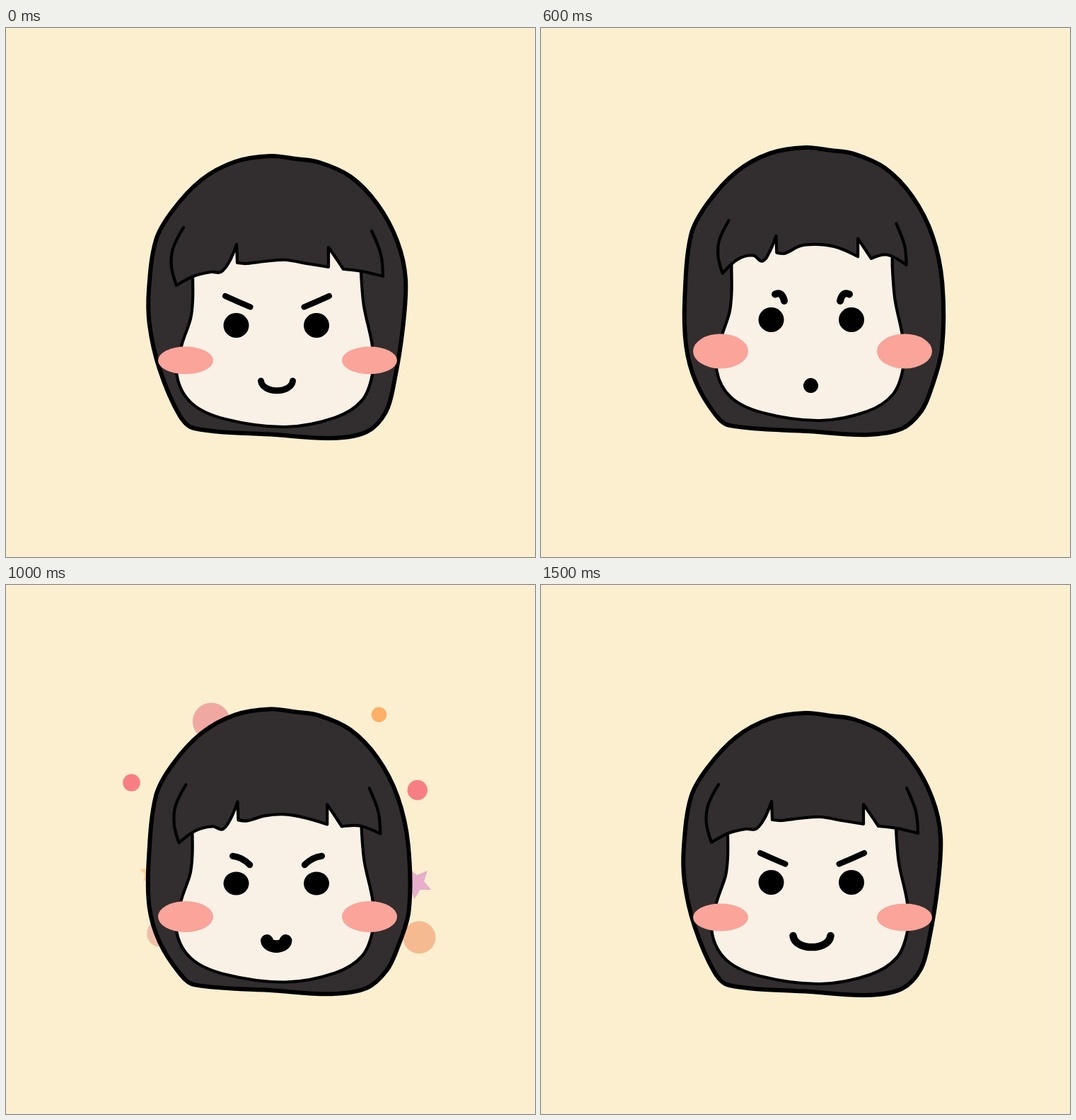
Recreate the animation shown at these times as an HTML page with a canvas. Size 748 by 748 pixels, loop 2 s.

```html
<!DOCTYPE html>
<html lang="en">
<head>
<meta charset="utf-8">
<title>Bobbing head</title>
<style>
  html, body { margin: 0; width: 100%; height: 100%; overflow: hidden; background: #fcefd0; }
  canvas { display: block; }
</style>
</head>
<body>
<canvas id="stage" width="748" height="748"></canvas>
<script>
const ctx = document.getElementById('stage').getContext('2d');
const LOOP = 2000, STEP = 100, CENTER = 384;
const BACKDROP = '#fcefd0', HAIR = '#322d2e', SKIN = '#f9f1e6', BLUSH = '#faa49a', INK = '#000';

// Outlines at rest, as flat x, y lists.
const HEAD = [374,181, 410,185, 443,190, 487,210, 525,249, 553,301, 565,355, 561,425, 549,500, 537,543, 510,571,
  460,580, 380,575, 266,566, 245,547, 217,482, 203,420, 202,370, 212,300, 235,259, 276,215, 324,189];
const FACE = [264,352, 264,385, 261,411, 248,450, 242,493, 263,531, 310,553, 395,564, 465,551, 503,527, 518,490,
  518,450, 506,393, 502,345];
const FRINGE = [251,282, 236,312, 234,338, 241,364, 265,351, 290,345, 304,345, 316,330, 326,306, 327,332, 340,333,
  365,330, 395,328, 425,333, 456,338, 456,310, 467,326, 477,341, 503,344, 533,351, 530,320, 517,287];
const FRINGE_CORNERS = [3, 8, 9, 14, 15, 17, 19];
const FRINGE_WAVES = [4, 5, 11, 12, 13, 18];

// top, bottom: head ends; sag, wide: cheeks sink and spread; fringeX, fringeY: fringe scale;
// jaw, chin: face scale and shift; curl: brows, fringe waves and blush; mouth: half width.
const smile = {
  top: 181, bottom: 580, sag: 0, wide: 0, fringeX: 1, fringeY: 1, jaw: 1, chin: 0, curl: 0,
  eyeY: 420.5, eyeR: 17.5, mouth: 22.5, mouthY: 499, lip: 9
};
const blink = {
  top: 177, bottom: 577, sag: 0.6, wide: -0.01, fringeX: 0.955, fringeY: 0.95, jaw: 0.96, chin: -4, curl: 1,
  eyeY: 416, eyeR: 8.5, mouth: 3.5, mouthY: 511.5, lip: 12
};
const stretch = {
  top: 169, bottom: 574, sag: 1, wide: 0.01, fringeX: 0.89, fringeY: 0.915, jaw: 0.955, chin: -9, curl: 1,
  eyeY: 412.5, eyeR: 17.5, mouth: 0.1, mouthY: 505.5, lip: 21
};
const surprise = { ...stretch, top: 173, bottom: 577, sag: 1.1, fringeY: 0.965, jaw: 0.99, chin: -2,
  eyeY: 420.5, eyeR: 18, mouthY: 511, lip: 25 };
const grin = { ...smile, mouth: 26.5, mouthY: 496, lip: 10.5 };
const squash = { ...grin, top: 178, bottom: 577, sag: 1, wide: 0.04, fringeX: 1.06, fringeY: 1.04,
  jaw: 1.02, chin: -3, eyeY: 423.5, eyeR: 15, mouthY: 495 };
const settle = { ...grin, bottom: 578, wide: -0.01, fringeY: 0.99, chin: -1, eyeY: 419, mouthY: 495 };
const poses = [[0, smile], [400, blink], [600, stretch], [900, surprise],
  [1100, squash], [1300, settle], [1500, grin], [LOOP, grin]];

// x, y: offset from the burst center at its peak; reach: how far it drifts on; left: opacity by then.
const BURST = { start: 900, peak: 1100, late: 1300, end: 1400, x: 384, y: 374 };
const confetti = [
  { color: '#efa9a2', r: 27, x: -107, y: -207, reach: 1.13, left: 0.55 },
  { color: '#ffaf66', r: 11, x: 164, y: -218, reach: 1.22, left: 0 },
  { color: '#f77f83', r: 12.5, x: -236, y: -108, reach: 1.22, left: 0 },
  { color: '#f77f83', r: 14.5, x: 226, y: -96, reach: 1.22, left: 0.08 },
  { color: '#f1bfa8', r: 19, x: -190, y: 136, reach: 1.38, left: 0.1 },
  { color: '#f6ba90', r: 23.5, x: 229, y: 142, reach: 1.22, left: 0 },
  { color: '#ffd09a', r: 16, x: -206, y: 38, reach: 1.23, left: 1, tilt: 116, spin: -26 },
  { color: '#e8aecb', r: 24, x: 224, y: 54, reach: 1.22, left: 0, tilt: 92, spin: -9 }
];

const lerp = (a, b, k) => a + (b - a) * k;

function poseAt(t) {
  const i = poses.findIndex(([time]) => time > t);
  const [t0, a] = poses[i - 1], [t1, b] = poses[i];
  return Object.fromEntries(Object.keys(a).map(key => [key, lerp(a[key], b[key], (t - t0) / (t1 - t0))]));
}

function warp(flat, move) {
  const points = [];
  for (let i = 0; i < flat.length; i += 2) points.push(move(flat[i], flat[i + 1], i / 2));
  return points;
}

// Smooth curve through points; corners and open ends keep no tangent.
function spline(points, closed, corners = []) {
  const n = points.length;
  const at = i => points[(i + n) % n];
  const tangent = i => {
    const j = i % n;
    if (corners.includes(j) || (!closed && (j === 0 || j === n - 1))) return [0, 0];
    const [ax, ay] = at(j - 1), [bx, by] = at(j + 1);
    const d = Math.hypot(bx - ax, by - ay);
    return [(bx - ax) / d, (by - ay) / d];
  };
  ctx.beginPath();
  ctx.moveTo(...at(0));
  for (let i = 0; i < (closed ? n : n - 1); i++) {
    const [ax, ay] = at(i), [bx, by] = at(i + 1);
    const [ux, uy] = tangent(i), [vx, vy] = tangent(i + 1);
    const s = Math.hypot(bx - ax, by - ay) / 3;
    ctx.bezierCurveTo(ax + ux * s, ay + uy * s, bx - vx * s, by - vy * s, bx, by);
  }
  if (closed) ctx.closePath();
}

function paint(fill, lineWidth) {
  if (fill) { ctx.fillStyle = fill; ctx.fill(); }
  if (lineWidth) { ctx.lineWidth = lineWidth; ctx.stroke(); }
}

function ellipse(x, y, rx, ry, fill) {
  ctx.beginPath();
  ctx.ellipse(x, y, rx, ry, 0, 0, 2 * Math.PI);
  paint(fill);
}

function star(x, y, r, degrees, fill) {
  ctx.beginPath();
  for (let i = 0; i < 10; i++) {
    const a = (degrees + i * 36) * Math.PI / 180, d = i % 2 ? r * 0.48 : r;
    ctx.lineTo(x + d * Math.cos(a), y + d * Math.sin(a));
  }
  ctx.closePath();
  paint(fill);
}

function drawConfetti(t) {
  if (t < BURST.start || t >= BURST.end) return;
  const k = (t - BURST.peak) / (BURST.late - BURST.peak);
  for (const { color, r, x, y, reach, left, tilt, spin } of confetti) {
    const spread = k < 0 ? 1 + k / 4 : lerp(1, reach, k);
    const px = BURST.x + x * spread, py = BURST.y + y * spread, size = r * (1 + 0.04 * k);
    ctx.globalAlpha = lerp(1, left, Math.max(0, k));
    if (spin) star(px, py, size, tilt + spin * k, color);
    else ellipse(px, py, size, size, color);
  }
  ctx.globalAlpha = 1;
}

function drawHair(p) {
  const stretchY = (p.bottom - p.top) / (smile.bottom - smile.top);
  spline(warp(HEAD, (x, y) => {
    const cheek = Math.exp(-(((y - 430) / 80) ** 2));
    return [x + cheek * ((x - CENTER) * p.wide + 4 * p.sag),
      p.top + (y - smile.top) * stretchY + 38 * p.sag * cheek];
  }), true);
  paint(HAIR, 6);
}

function drawFace(p) {
  const fringe = warp(FRINGE, (x, y, i) => [
    CENTER + (x - CENTER) * p.fringeX,
    164 + (y - 164) * p.fringeY - (FRINGE_WAVES.includes(i) ? 8 * p.curl : 0)
  ]);
  const face = warp(FACE, (x, y) => [CENTER + (x - CENTER) * p.jaw, y + p.chin]);
  const hairline = fringe[8][1] - 8;

  spline(face, false);
  ctx.lineTo(face[face.length - 1][0], hairline);
  ctx.lineTo(face[0][0], hairline);
  ctx.closePath();
  paint(SKIN, 4.2);

  spline(fringe, false, FRINGE_CORNERS);
  paint(HAIR, 4.2);
}

function drawFeatures(p) {
  const { curl, eyeY } = p;
  for (const side of [-1, 1]) {
    ellipse(CENTER + side * 130, eyeY + 49.5 - 5 * curl, 39, 19.5 + 5 * curl, BLUSH);
    ellipse(382.25 + side * 56.75, eyeY, 18, p.eyeR, INK);

    const brow = (straight, curled) => [383.5 + side * lerp(straight[0], curled[0], curl),
      eyeY + lerp(straight[1], curled[1], curl)];
    ctx.beginPath();
    ctx.moveTo(...brow([73.5, -41.5], [52.5, -36]));
    ctx.quadraticCurveTo(...brow([56, -33.5], [43, -41]), ...brow([38, -26], [39.5, -26.5]));
    paint(null, 8 + 2 * curl);
  }

  const x = 383 - 1.5 * curl, half = p.mouth, low = p.mouthY + half * 0.81;
  ctx.beginPath();
  ctx.moveTo(x - half, p.mouthY);
  ctx.bezierCurveTo(x - half * 0.9, low, x + half * 0.9, low, x + half, p.mouthY);
  paint(null, p.lip);
}

function render() {
  const t = Math.floor(performance.now() % LOOP / STEP) * STEP;
  const pose = poseAt(t);
  ctx.fillStyle = BACKDROP;
  ctx.fillRect(0, 0, 748, 748);
  ctx.strokeStyle = INK;
  ctx.lineCap = ctx.lineJoin = 'round';
  drawConfetti(t);
  drawHair(pose);
  drawFace(pose);
  drawFeatures(pose);
  requestAnimationFrame(render);
}
render();
</script>
</body>
</html>
```
